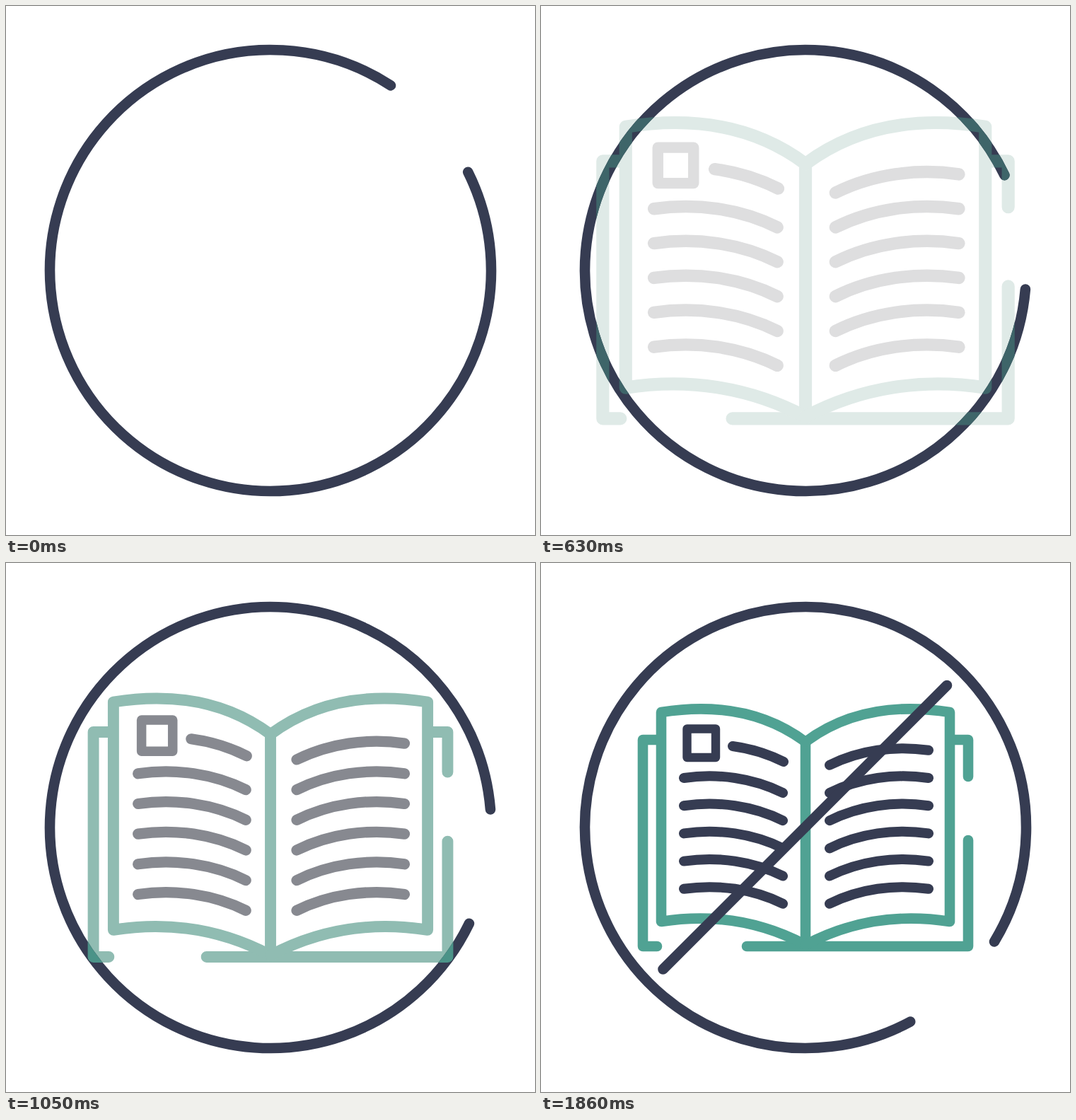
An HTML page for the animation above (4.79 s loop, 748 px wide and 748 px high).

```html
<!DOCTYPE html>
<html lang="en">
<head>
<meta charset="utf-8">
<title>No reading</title>
<style>
  html, body { margin: 0; width: 100%; height: 100%; overflow: hidden; background: #fff; }
  svg { display: block; width: 100%; height: 100%; }
  .line { fill: none; stroke-width: 14.6; stroke-linecap: round; stroke-linejoin: round; }
</style>
</head>
<body>
<svg viewBox="0 0 748 748">
  <defs>
    <circle id="ring" class="line" cx="374" cy="374" r="312" pathLength="360"
      stroke-dasharray="329.5 30.5" stroke="var(--ink)"/>
    <g id="cover" class="line" stroke="var(--teal)">
      <path d="M164 250H144V542H164M584 250H604V302M604 392V542H291M374 253V542"/>
      <path id="page" d="M374 253C315 209 245 199 170 211V507C240 496 310 506 374 540"/>
      <use href="#page" transform="translate(748) scale(-1 1)"/>
    </g>
    <path id="row" d="M202 304C250 297 300 304 342 325"/>
    <mask id="onRing" maskUnits="userSpaceOnUse" x="0" y="0" width="748" height="748">
      <use class="spin" href="#ring" style="--ink:#fff"/>
    </mask>
  </defs>
  <g class="book">
    <use id="base" href="#cover"/>
    <g id="print" class="line" style="stroke-width:14">
      <rect x="206.5" y="234.5" width="40.5" height="40.5" stroke-width="12.4" style="stroke-width:12.4"/>
      <path d="M271 259Q309 264 343 281"/>
    </g>
  </g>
  <use class="spin" href="#ring" style="--ink:#363c52"/>
  <g mask="url(#onRing)">
    <g class="book"><use id="over" href="#cover"/></g>
  </g>
  <path id="slash" class="line" stroke="#363c52" d="M574 173L172.500 574.500"/>
</svg>
<script>
const LOOP = 4790, STEP = 30;
const WHITE = [255, 255, 255], INK = [54, 60, 82], TEAL = [80, 162, 147];
const $ = id => document.getElementById(id);
const all = cls => document.querySelectorAll('.' + cls);
const ramp = (t, a, b) => Math.min(1, Math.max(0, (t - a) / (b - a)));

// Blend in linear light
const toLinear = v => Math.pow(v / 255, 2.2);
const mix = (a, b, p) => 'rgb(' + a.map((v, i) =>
  Math.round(255 * Math.pow(toLinear(v) * (1 - p) + toLinear(b[i]) * p, 1 / 2.2))) + ')';

const zoom = s => `translate(374 374) scale(${s}) translate(-374 -374)`;

function addRow(n, mirrored) {
  const row = document.createElementNS('http://www.w3.org/2000/svg', 'use');
  const flip = mirrored ? 'translate(750) scale(-1 1) ' : '';
  row.setAttribute('href', '#row');
  row.setAttribute('transform', `${flip}translate(0 ${n * 39.2})`);
  $('print').append(row);
}
for (let n = -1; n < 5; n++) {
  if (n >= 0) addRow(n, false);
  addRow(n, true);
}

function draw(t) {
  const turn = -26.5 + 0.0498 * Math.min(t, 1770);
  all('spin').forEach(e => e.setAttribute('transform', `rotate(${turn} 374 374)`));

  const size = 1 + 0.000375 * Math.max(0, 1287 - t);
  const fade = ramp(t, 400, 1235);
  all('book').forEach(e => {
    e.setAttribute('transform', zoom(size));
    e.style.display = fade > 0 ? '' : 'none';
  });
  $('base').style.setProperty('--teal', mix(WHITE, TEAL, fade));
  $('over').style.setProperty('--teal', mix(INK, TEAL, fade));
  $('print').style.stroke = mix(WHITE, INK, fade);

  const strike = ramp(t, 1470, 1860);
  $('slash').setAttribute('transform', zoom(1 + (1 - strike) / 3));
  $('slash').style.opacity = Math.pow(strike, 1.5);
}

let start;
function tick(now) {
  start ??= now;
  const t = Math.max(0, now - start) % LOOP;
  draw(Math.floor(t / STEP + 0.01) * STEP);
  requestAnimationFrame(tick);
}
draw(0);
requestAnimationFrame(tick);
</script>
</body>
</html>
```
